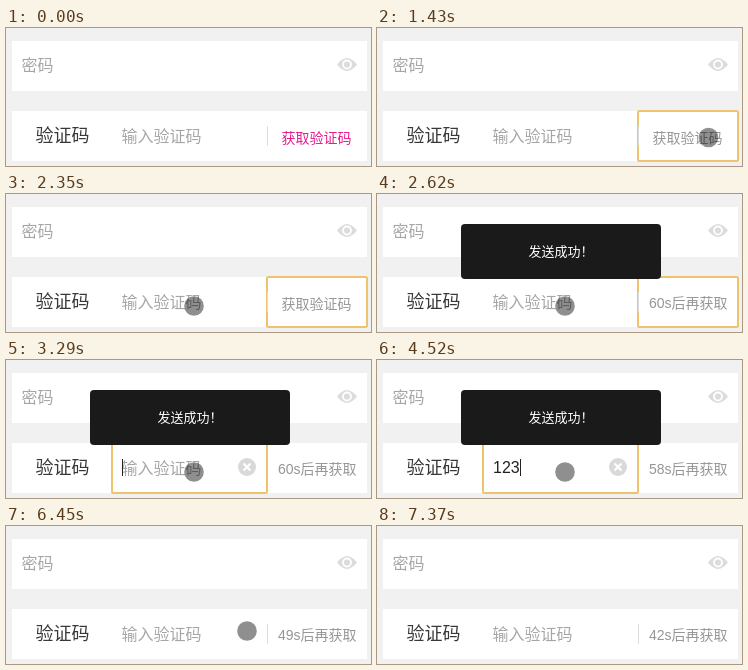
Write an HTML page that moves like this. It is 365 by 138 pixels and loops after 7.47 s.

```html
<!DOCTYPE html>
<html lang="zh-CN">
<head>
<meta charset="utf-8">
<title>验证码</title>
<style>
  html, body { margin: 0; width: 100%; height: 100%; overflow: hidden; background: #f1f1f1; }
  svg { display: block; width: 365px; height: 138px; }
  text { font: 300 16px "Liberation Sans", "Noto Sans CJK SC", "Noto Sans CJK", sans-serif; fill: #a6a6a6; }
  .label { font-size: 18px; fill: #383838; }
  .action { font-size: 14px; fill: #969696; }
  .action.ready { fill: #e61a8b; }
  .typed { fill: #222; }
  .toast { font-size: 13px; fill: #fff; }
  .ring { fill: none; stroke: #efc26c; stroke-width: 2; }
</style>
</head>
<body>
<svg viewBox="0 0 365 138">
  <rect width="365" height="138" fill="#f1f1f1"/>
  <g fill="#fff">
    <rect x="6" y="13" width="355" height="50"/>
    <rect x="6" y="83" width="355" height="50"/>
  </g>
  <text x="15.5" y="43">密码</text>
  <path d="M331 36.5Q341 23.5 351 36.5Q341 49.5 331 36.5Z" fill="#dcdcdf"/>
  <circle cx="341" cy="36.5" r="4" fill="#dcdcdf" stroke="#fff" stroke-width="1.8"/>

  <text class="label" x="29.5" y="114">验证码</text>
  <text id="placeholder" x="115.5" y="113.5">输入验证码</text>
  <text id="typed" class="typed" x="116" y="113"></text>
  <rect id="caret" y="99" width="1" height="17" fill="#222"/>
  <g id="clear">
    <circle cx="241" cy="107" r="9" fill="#d9d9d9"/>
    <path d="M237.5 103.5l7 7m0-7l-7 7" stroke="#fff" stroke-width="2.2"/>
  </g>
  <text id="action" class="action"></text>
  <rect id="buttonRing" class="ring" x="261" y="83" width="100" height="50" rx="1.5"/>
  <rect x="261" y="98" width="1" height="20" fill="#ddd"/>
  <rect id="inputRing" class="ring" x="106" y="83" width="155" height="50" rx="1.5"/>

  <g id="toast">
    <rect x="84" y="30" width="200" height="55" rx="4" fill="#1a1a1a"/>
    <text class="toast" x="151.5" y="62">发送成功！</text>
  </g>
  <circle id="pointer" r="9.8" fill="#000" fill-opacity=".44"/>
</svg>
<script>
  const LOOP = 7470;
  const PRESS = 1430, SENT = 2620, FOCUS = 3290, TOAST_END = 5490, CLEARED = 6330, BLUR = 6450;
  const POINTER_STEP = 125;
  const route = [
    { t: PRESS, x: 331.5, y: 109.5 },
    { t: 1680, x: 288.5, y: 125 },
    { t: 2055, x: 195, y: 114 },
    { t: 2305, x: 188, y: 112 },
    { t: 5800, x: 188, y: 112 },
    { t: 6180, x: 241, y: 105 }
  ];

  const el = id => document.getElementById(id);
  const show = (id, on) => el(id).style.display = on ? '' : 'none';
  const within = (t, from, to) => t >= from && t < to;
  const clamp = (v, low, high) => Math.min(high, Math.max(low, v));
  const ticks = (t, start, gap) => Math.floor((t - start) / gap);

  // Digits arrive in two bursts of three.
  const burst = (t, start, gap) => clamp(ticks(t, start, gap) + 1, 0, 3);
  const typedLength = t => t < CLEARED ? burst(t, 4120, 200) + burst(t, 4920, 150) : 0;

  // The countdown runs much faster once the toast is gone.
  const secondsLeft = t => t < TOAST_END
    ? 60 - Math.max(0, ticks(t, 2740, 830))
    : 54 - Math.max(0, ticks(t, 5915, 131) + 1);

  function pointerAt(t) {
    const stepped = PRESS + ticks(t, PRESS, POINTER_STEP) * POINTER_STEP;
    const next = Math.max(1, route.findIndex(p => p.t > stepped));
    const index = stepped >= route.at(-1).t ? route.length - 1 : next;
    const a = route[index - 1], b = route[index];
    const k = clamp((stepped - a.t) / (b.t - a.t), 0, 1);
    return { x: a.x + (b.x - a.x) * k, y: a.y + (b.y - a.y) * k };
  }

  function render(t) {
    const waiting = t >= SENT;
    const action = el('action');
    action.textContent = waiting ? `${secondsLeft(t)}s后再获取` : '获取验证码';
    action.setAttribute('x', waiting ? 272 : 275.5);
    action.setAttribute('y', waiting ? 114 : 114.5);
    action.classList.toggle('ready', t < PRESS);

    const length = typedLength(t);
    el('typed').textContent = '123456'.slice(0, length);
    show('placeholder', length === 0);

    const focused = within(t, FOCUS, BLUR);
    show('inputRing', focused);
    show('clear', focused);
    show('buttonRing', within(t, PRESS, FOCUS));
    show('caret', focused && !within(t, 3720, 4120));
    el('caret').setAttribute('x', Math.round(116 + length * 8.9));

    show('toast', within(t, SENT, TOAST_END));

    show('pointer', within(t, 1280, 6690));
    const { x, y } = pointerAt(t);
    el('pointer').setAttribute('cx', x);
    el('pointer').setAttribute('cy', y);
  }

  const begin = performance.now();
  function tick() {
    render((performance.now() - begin) % LOOP);
    requestAnimationFrame(tick);
  }
  tick();
</script>
</body>
</html>
```
